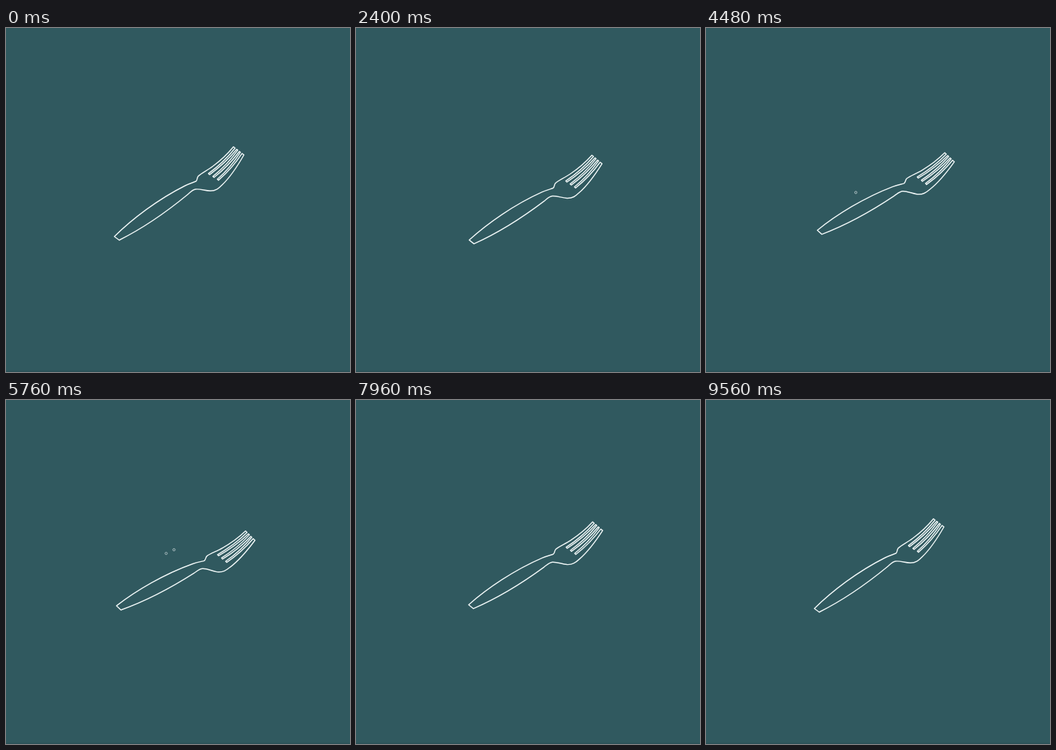
An HTML page for the animation above (9.64 s loop, 480 by 480 pixels).

```html
<!DOCTYPE html>
<html lang="en">
<head>
<meta charset="utf-8">
<title>Floating fork</title>
<style>
  html, body { margin: 0; width: 100%; height: 100%; overflow: hidden; background: #30595f; }
  svg { display: block; width: 100%; height: 100%; }
</style>
</head>
<body>
<svg viewBox="0 0 480 480" fill="none" stroke="#f1f8f8">
  <rect y="478.5" width="480" height="1.5" fill="#2b5058" stroke="none"/>
  <g id="bubbles" stroke-width="0.8"></g>
  <path id="fork" stroke-width="1.45" stroke-linejoin="round" stroke-linecap="round"/>
</svg>
<script>
const LOOP = 9640, END = 9560, STEP = 40;
const TAIL = { x: 151, y: 291 };
const fork = document.getElementById('fork');
const layer = document.getElementById('bubbles');

const mix = (a, b, p) => a + (b - a) * p;
const easeOut = p => 1 - (1 - p) * (1 - p);
const easeInOut = p => p * p * (3 - 2 * p);

// Gap number i between two tines: down to its closed end and back to the tips
function slot(i) {
  const x = 320.8 + 3.7 * i, y = 168.4 + 2.9 * i;
  const u = 283.3 + 6.2 * i, v = 203.9 + 3.9 * i;
  const mx = (x + u) / 2 + 2.6, my = (y + v) / 2 + 2.2;
  const edge = s => [`${x + s * 1.1} ${y + s * 0.9}`, `${mx + s * 0.9} ${my + s * 0.8}`, `${u + s * 0.8} ${v + s * 0.7}`];
  const [a, b, c] = edge(-1), [d, e, f] = edge(1);
  return `L${a} Q${b} ${c} L${f} Q${e} ${d}`;
}

fork.setAttribute('d',
  'M158 296 L151.2 291 C176 266.5 212 239 250 220 C256 217 261 215.6 265 214' +
  'C267.5 212 266 209.5 268.2 206.8 C272 203 281 198.6 288.5 193 C299.5 185 309 176 317.4 165.8' +
  [0, 1, 2].map(slot).join('') +
  'L332 177 C324 191 314 207 302 218.5 C297 223.6 293 227.2 285 227.2' +
  'C277 226.8 271 224.2 264.5 225 C260 225.6 257 229.5 253 232.8' +
  'C226 255 191 279.5 158 296 Z');

// Turning points [time, value], eased in and out between them
const tracks = {
  x: [[0, 151], [2400, 157.8], [5700, 154], [7900, 157], [END, 151]],
  y: [[0, 291], [2060, 296.6], [4480, 282.2], [6200, 288.1], [7500, 284.9], [END, 291]],
  turn: [[0, 0], [6200, 7], [END, 0]]
};

function at(track, t) {
  const i = track.findIndex(k => k[0] > t);
  if (i < 0) return track[track.length - 1][1];
  const [t0, a] = track[i - 1], [t1, b] = track[i];
  return mix(a, b, easeInOut((t - t0) / (t1 - t0)));
}

const bubbles = [
  { t0: 570, t1: 2330, from: [320, 175], to: [368.6, 67], r: 2.8, ease: easeOut },
  { t0: 570, t1: 2330, from: [331, 183], to: [376.5, 81.5], r: 2.6, ease: easeOut },
  { t0: 3600, t1: 6400, from: [203.7, 235.2], to: [226.5, 210.8], r: 1.6, ease: easeInOut },
  { t0: 4500, t1: 7500, from: [220.5, 240], to: [257, 158.5], r: 1.6, ease: easeInOut }
];

for (const b of bubbles) {
  b.el = layer.appendChild(document.createElementNS('http://www.w3.org/2000/svg', 'circle'));
}

function drawBubble(b, t) {
  const p = (t - b.t0) / (b.t1 - b.t0);
  const on = p > 0 && p < 1;
  b.el.setAttribute('opacity', on ? 0.8 * Math.min(1, p * 6, (1 - p) * 4) : 0);
  if (!on) return;
  const e = b.ease(p);
  b.el.setAttribute('cx', mix(b.from[0], b.to[0], e));
  b.el.setAttribute('cy', mix(b.from[1], b.to[1], e));
  b.el.setAttribute('r', b.r * Math.min(1, 0.4 + p * 4));
}

function draw(t) {
  const dx = at(tracks.x, t) - TAIL.x, dy = at(tracks.y, t) - TAIL.y;
  fork.setAttribute('transform',
    `translate(${dx} ${dy}) rotate(${at(tracks.turn, t)} ${TAIL.x} ${TAIL.y})`);
  bubbles.forEach(b => drawBubble(b, t));
}

const start = performance.now();
function tick() {
  const t = (performance.now() - start) % LOOP;
  draw(Math.floor(t / STEP) * STEP);
  requestAnimationFrame(tick);
}
draw(0);
requestAnimationFrame(tick);
</script>
</body>
</html>
```
